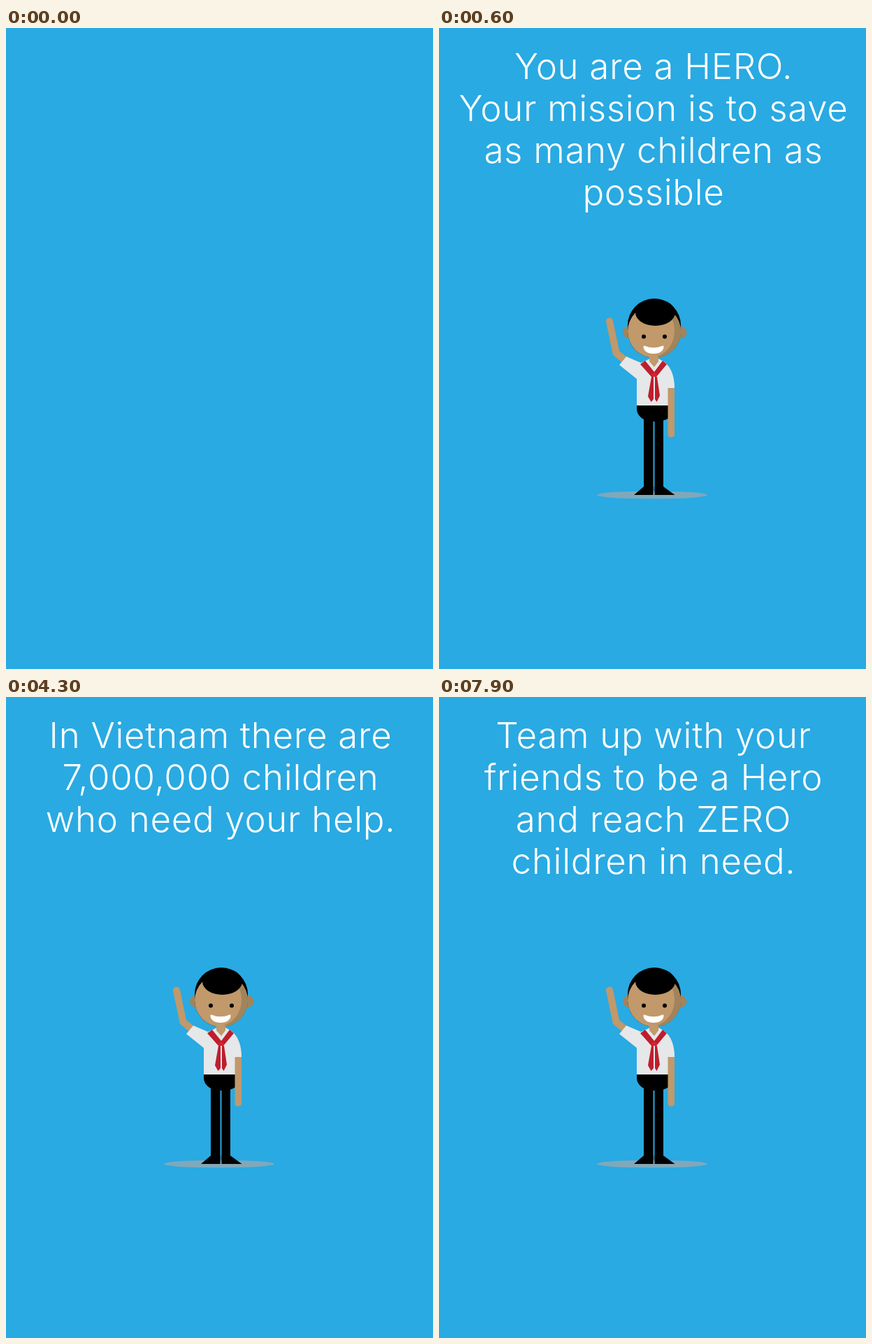
An HTML page without scripts for the animation above (8000 ms loop, 611 by 917 pixels).

```html
<!DOCTYPE html>
<html lang="en">
<head>
<meta charset="utf-8">
<title>Hero mission</title>
<style>
  html, body { margin: 0; width: 100%; height: 100%; overflow: hidden; background: #29aae2; }
  svg { display: block; width: 100%; height: 100%; }

  text {
    font: 300 51px Inter, "Open Sans", sans-serif;
    letter-spacing: .7px;
    fill: #fff;
    text-anchor: middle;
  }

  .boy * { animation: appear 8s step-end infinite; }
  .msg { animation: 8s step-end infinite; transform: translateY(-300px); }
  .mission { animation-name: mission; }
  .need { animation-name: need; }
  .team { animation-name: team; }

  .skin { fill: #c1996b; }
  .tan { fill: #a1845b; }
  .shirt { fill: #e6e7e8; }
  .red { fill: #be1e2d; }
  .white { fill: #fff; }
  .arm { fill: none; stroke: #c1996b; stroke-width: 10; stroke-linejoin: round; }

  @keyframes appear {
    0% { opacity: 0; }
    3.75% { opacity: .3; }
    5% { opacity: .7; }
    6.25%, 100% { opacity: 1; }
  }
  @keyframes mission {
    0% { transform: translateY(-300px); }
    6.25% { transform: translateY(-144px); }
    7.5% { transform: none; }
    46.25% { transform: translateY(-136px); }
    47.5%, 100% { transform: translateY(-300px); }
  }
  @keyframes need {
    0% { transform: translateY(-300px); }
    52.5% { transform: translateY(-130px); }
    53.75% { transform: none; }
    90% { transform: translateY(-143px); }
    91.25%, 100% { transform: translateY(-300px); }
  }
  @keyframes team {
    0% { transform: translateY(-300px); }
    98.75%, 100% { transform: none; }
  }
</style>
</head>
<body>
<svg viewBox="0 0 611 917">
  <g class="boy">
    <ellipse cx="305" cy="668" rx="79" ry="5.5" fill="#80a8bb"/>

    <!-- legs and shoes -->
    <path d="M293 554h13.500v108q0 6-6.750 6t-6.750-6z"/>
    <path d="M308.500 554h12.500v108q0 6-6.250 6t-6.250-6z"/>
    <path d="M293 656h13.500v12h-27.500z"/>
    <path d="M308.500 656h12.500l16.500 12h-29z"/>
    <path d="M283 539h48v17c-5 5-14 7-24 7c-14 0-24-8-24-18z"/>

    <!-- head -->
    <circle class="tan" cx="271.500" cy="435.500" r="8.500"/>
    <circle class="tan" cx="346" cy="435.500" r="8.500"/>
    <rect x="270" y="387" width="76" height="85" rx="38"/>
    <circle class="skin" cx="308" cy="434" r="38"/>
    <path class="tan" d="M308 396a38 38 0 0 1 0 76q-2 0-3-.5c19-3 32-18 32-39c0-18-11-32-29-36.500z"/>
    <ellipse cx="309.500" cy="407" rx="28.500" ry="19"/>
    <circle cx="293" cy="441.500" r="3"/>
    <circle cx="323" cy="441.500" r="3"/>
    <path class="white" d="M292.500 456q0-2 2-1.200q12.500 5 25 0q2-.8 2 1.200c0 6-6 10-14.500 10s-14.500-4-14.500-10z"/>

    <!-- body -->
    <path class="arm" stroke-linecap="round" d="M244 419.500L253.500 465L266 475"/>
    <path class="shirt" d="M268 470l21 9l13-6h12l9 5q14 12 14 37h-9v25h-45v-38l-25-20z"/>
    <path class="skin" d="M301 470h13v7l-6 8l-7-8z"/>
    <path class="skin" d="M327.500 515h9.500v66q0 4.500-4.750 4.500t-4.750-4.500z"/>
    <path class="red" d="M295 476l-7 5l16 18h7l15-18l-6-5l-12 16z"/>
    <path class="red" d="M304 499h3v32l-3.500 4l-4.500-8z"/>
    <path class="red" d="M312 499h-3v32l2.500 4l4.500-9z"/>
    <path fill="#d9212f" d="M304 495l4-2l4 2l-1 4h-6z"/>
  </g>

  <g class="msg mission">
    <text x="307" y="72.700">You are a HERO.</text>
    <text x="307" y="132.700">Your mission is to save</text>
    <text x="307" y="192.700">as many children as</text>
    <text x="307" y="252.700">possible</text>
  </g>
  <g class="msg need">
    <text x="307" y="72.700">In Vietnam there are</text>
    <text x="307" y="132.700">7,000,000 children</text>
    <text x="307" y="192.700">who need your help.</text>
  </g>
  <g class="msg team">
    <text x="307" y="72.700">Team up with your</text>
    <text x="307" y="132.700">friends to be a Hero</text>
    <text x="307" y="192.700">and reach ZERO</text>
    <text x="307" y="252.700">children in need.</text>
  </g>
</svg>
</body>
</html>
```
